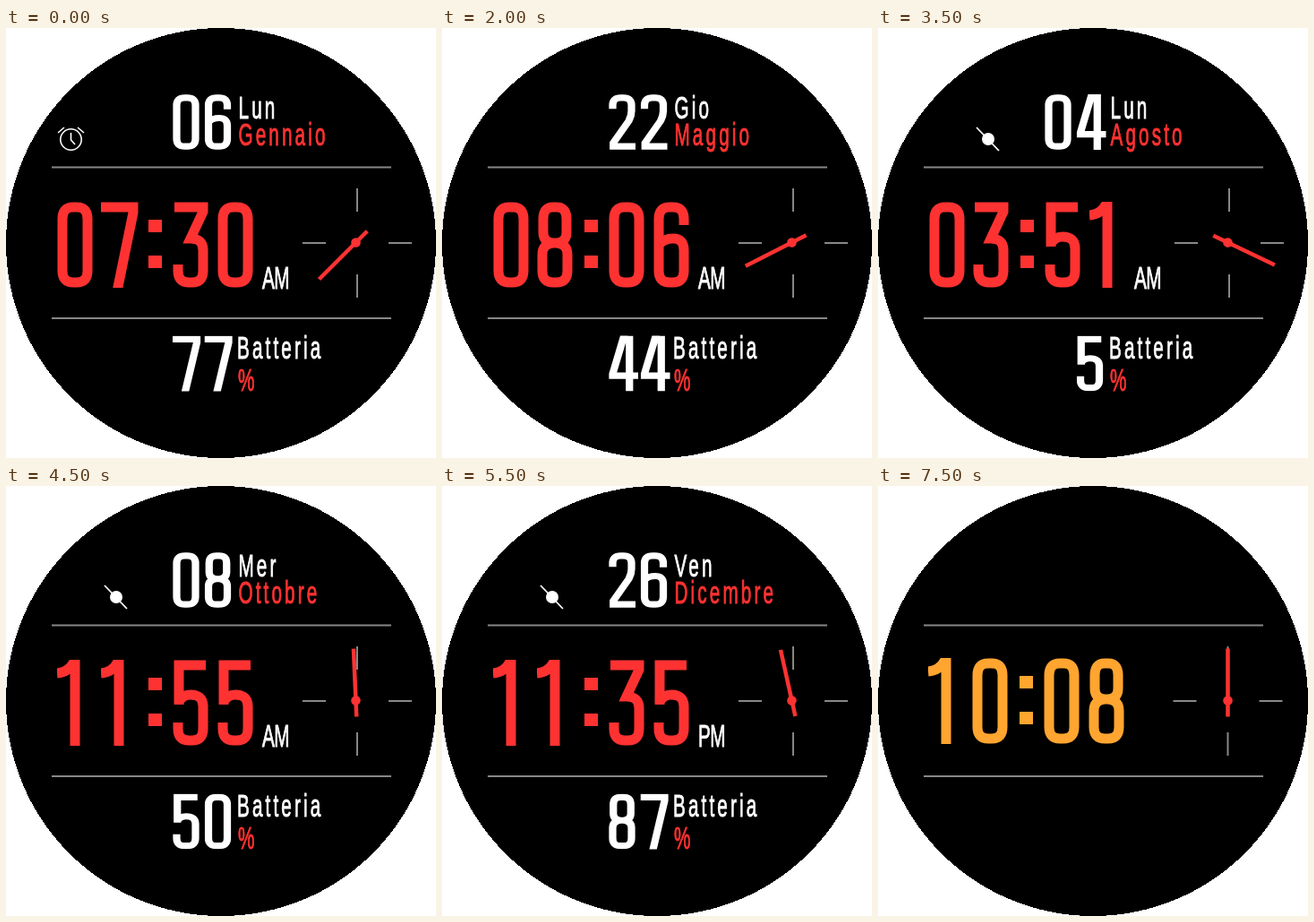
An HTML page with a canvas that plays this animation: 480x480 px, repeating every 8000 ms.

```html
<!DOCTYPE html>
<html lang="it">
<head>
<meta charset="utf-8">
<style>
  html, body { margin: 0; width: 100%; height: 100%; overflow: hidden; background: #fff; }
  canvas { display: block; }
</style>
</head>
<body>
<canvas id="face" width="480" height="480"></canvas>
<script>
const ctx = document.getElementById('face').getContext('2d');
const RED = '#ff3232', ORANGE = '#ffa530', GRAY = '#858885', WHITE = '#fff';
const STEP = 500;

// Digit centre lines in a 40 x 96 box, drawn with an 11 unit pen
const DIGITS = [
  'M6 19Q6 6 18 6h4Q34 6 34 19V77Q34 90 22 90h-4Q6 90 6 77Z',
  'M0 15Q13 14 19 2M20 0V96',
  'M6 25V19Q6 6 18 6h4Q34 6 34 19V29Q34 37 30 46L7 84V90H40',
  'M2 6H34V11L20 41Q34 41 34 54V77Q34 90 22 90h-4Q6 90 6 77V70',
  'M24 -4L6 66V69H44M31 0V96',
  'M37 6H7V50M7 47Q11 39 20 39Q34 39 34 52V77Q34 90 22 90h-4Q6 90 6 77V70',
  'M34 26V19Q34 6 22 6h-4Q6 6 6 19V77Q6 90 18 90h4Q34 90 34 77V54Q34 41 22 41Q12 41 6 48',
  'M0 6H36V12L18 100',
  'M18 46Q7 45 7 34V19Q7 6 18 6h4Q33 6 33 19V34Q33 45 22 46ZM18 46Q6 47 6 59V77Q6 90 18 90h4Q34 90 34 77V59Q34 47 22 46Z',
  'M6 70V77Q6 90 18 90h4Q34 90 34 77V19Q34 6 22 6h-4Q6 6 6 19V42Q6 55 18 55Q28 55 34 48'
].map(d => new Path2D(d));

// day, weekday, month, time, AM/PM, battery, alarm, bluetooth off
const SCREENS = [
  ['06', 'Lun', 'Gennaio', '07:30', 'AM', '77', 1, 0],
  ['14', 'Ven', 'Febbraio', '08:12', 'PM', '72', 0, 1],
  ['12', 'Mer', 'Marzo', '04:23', 'PM', '67', 1, 1],
  ['15', 'Mar', 'Aprile', '06:45', 'AM', '58', 1, 0],
  ['22', 'Gio', 'Maggio', '08:06', 'AM', '44', 0, 0],
  ['28', 'Sab', 'Giugno', '10:34', 'PM', '30', 1, 1],
  ['10', 'Gio', 'Luglio', '09:17', 'PM', '18', 1, 0],
  ['04', 'Lun', 'Agosto', '03:51', 'AM', '5', 0, 1],
  ['16', 'Mar', 'Settembre', '08:02', 'PM', '26', 1, 0],
  ['08', 'Mer', 'Ottobre', '11:55', 'AM', '50', 0, 1],
  ['23', 'Dom', 'Novembre', '09:09', 'AM', '69', 1, 0],
  ['26', 'Ven', 'Dicembre', '11:35', 'PM', '87', 0, 1],
  ['26', 'Ven', 'Dicembre', '11:35', 'PM', '87', 0, 1],
  ['10', 'Ven', 'Gennaio', '10:08', 'AM', '80', 0, 1]
];
const AMBIENT_COLORS = [RED, ORANGE];

function line(color, width, ...points) {
  ctx.strokeStyle = color;
  ctx.lineWidth = width;
  ctx.beginPath();
  for (let i = 0; i < points.length; i += 4) {
    ctx.moveTo(points[i], points[i + 1]);
    ctx.lineTo(points[i + 2], points[i + 3]);
  }
  ctx.stroke();
}

function disc(x, y, r, color) {
  ctx.fillStyle = color;
  ctx.beginPath();
  ctx.arc(x, y, r, 0, 2 * Math.PI);
  ctx.fill();
}

// Row by row, so that the rim stays hard-edged
function background() {
  ctx.fillStyle = WHITE;
  ctx.fillRect(0, 0, 480, 480);
  ctx.fillStyle = '#000';
  for (let y = 0; y < 480; y++) {
    const half = Math.round(Math.sqrt(240 ** 2 - (y - 239.5) ** 2));
    ctx.fillRect(240 - half, y, 2 * half, 1);
  }
}

function digit(char, x, y, color, sx = 1, sy = 1) {
  ctx.save();
  ctx.translate(x, y);
  ctx.scale(sx, sy);
  ctx.beginPath();
  ctx.rect(0, 0, 46, 96);
  ctx.clip();
  ctx.strokeStyle = color;
  ctx.lineWidth = 11;
  ctx.stroke(DIGITS[char]);
  ctx.restore();
}

function smallNumber(text, y) {
  [...text.padStart(2)].forEach((char, i) => {
    if (char !== ' ') digit(char, 186 + 35.5 * i, y, WHITE, 0.75, 0.646);
  });
}

function label(text, x, y, color, spacing = 5.2) {
  ctx.save();
  ctx.translate(x, y);
  ctx.scale(0.6, 1);
  ctx.font = '34.5px "Liberation Sans", sans-serif';
  ctx.letterSpacing = spacing + 'px';
  ctx.fillStyle = ctx.strokeStyle = color;
  ctx.lineWidth = 1;
  ctx.fillText(text, 0, 0);
  ctx.strokeText(text, 0, 0);
  ctx.restore();
}

function bigTime(time, x, y, color) {
  [0, 49, null, 129, 179].forEach((dx, i) => {
    if (dx !== null) digit(time[i], x + dx, y, color);
  });
  ctx.fillStyle = color;
  ctx.fillRect(x + 102, y + 20, 15, 14);
  ctx.fillRect(x + 102, y + 60, 15, 14);
}

function dial(x, angle) {
  line(GRAY, 2, x, 179, x, 205, x, 275, x, 301,
    x - 61, 240, x - 35, 240, x + 35, 240, x + 61, 240);
  ctx.save();
  ctx.translate(390.5, 239.5);
  ctx.rotate(angle);
  line(RED, 4.5, 0, -58, 0, 18);
  disc(0, 0, 5.3, RED);
  ctx.restore();
}

function alarmIcon() {
  line(WHITE, 1.6, 58, 117, 65, 111, 80, 111, 87, 117, 72.5, 117, 72.5, 125.5, 72.5, 125, 77, 130);
  ctx.beginPath();
  ctx.arc(72.5, 124.5, 11.7, 0, 2 * Math.PI);
  ctx.stroke();
}

function bluetoothOffIcon() {
  disc(123, 124, 7, WHITE);
  line(WHITE, 1.8, 110, 111, 135, 137);
}

function hourAngle(time) {
  const [hours, minutes] = time.split(':').map(Number);
  return (hours + minutes / 60) * Math.PI / 6;
}

function drawScreen([day, weekday, month, time, half, battery, alarm, bluetoothOff]) {
  smallNumber(day, 74);
  label(weekday, 259.5, 100.5, WHITE);
  label(month, 259.5, 130.5, RED);
  if (alarm) alarmIcon();
  if (bluetoothOff) bluetoothOffIcon();
  bigTime(time, 57, 194, RED);
  label(half, 286, 290.5, WHITE, -1);
  dial(392, hourAngle(time));
  smallNumber(battery, 343.5);
  label('Batteria', 258, 368.5, WHITE);
  label('%', 259, 404.5, RED);
}

function render(now) {
  const step = Math.floor(now / STEP) % (SCREENS.length + AMBIENT_COLORS.length);
  background();
  line(GRAY, 2, 51, 155.5, 430, 155.5, 51, 324, 430, 324);
  if (step < SCREENS.length) {
    drawScreen(SCREENS[step]);
  } else {
    bigTime('10:08', 56, 192, AMBIENT_COLORS[step - SCREENS.length]);
    dial(390.5, 0);
  }
}

let start;
function tick(now) {
  start ??= now;
  render(now - start);
  requestAnimationFrame(tick);
}
render(0);
requestAnimationFrame(tick);
</script>
</body>
</html>
```
